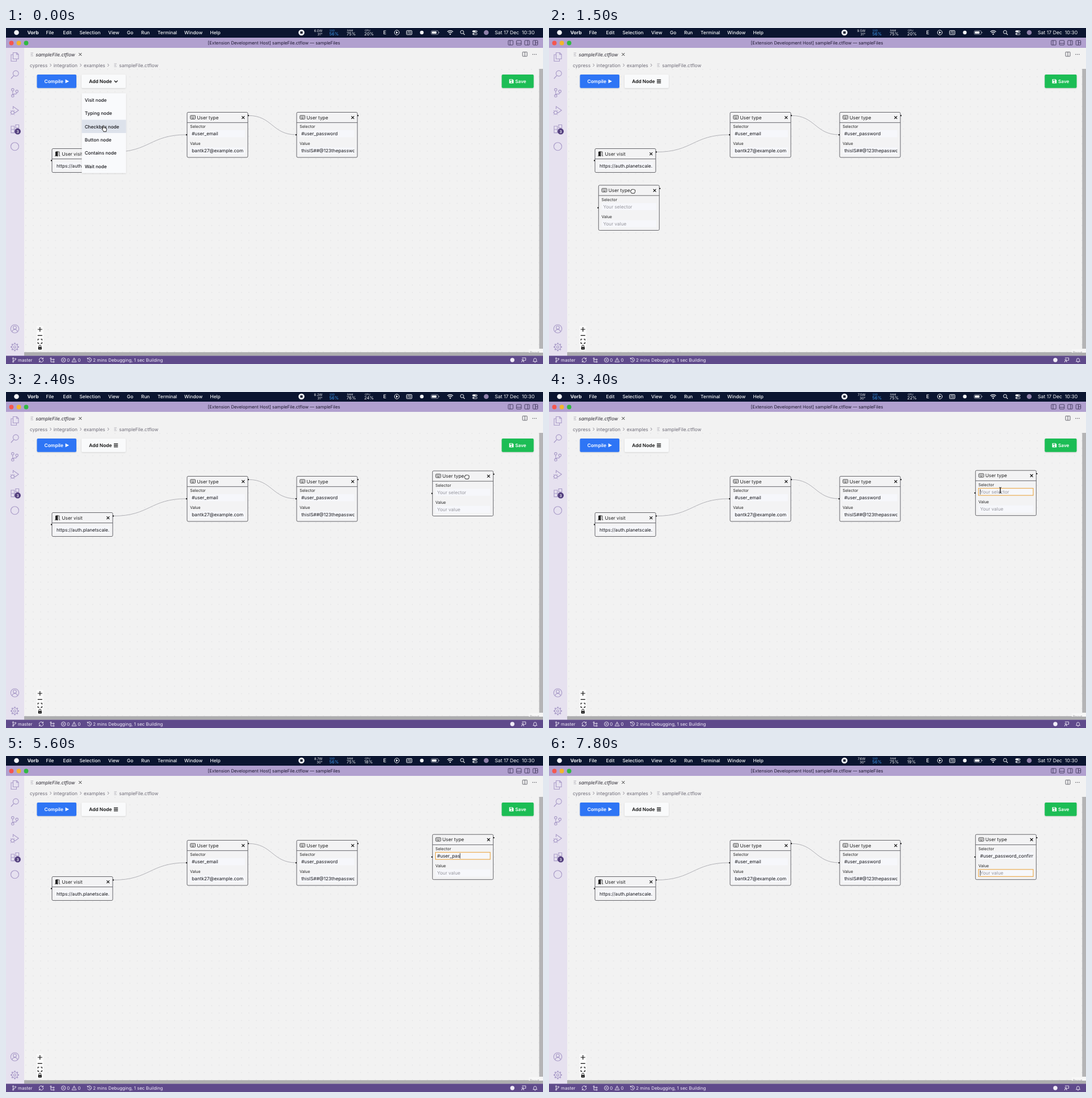
An HTML page for the animation above (8000 ms loop, 946 px wide and 592 px high).

```html
<!DOCTYPE html>
<html lang="en">
<head>
<meta charset="utf-8">
<title>Flow editor</title>
<style>
  html, body { margin: 0; width: 100%; height: 100%; overflow: hidden; background: #f2f2f2; }
  svg { display: block; width: 100vw; height: 100vh; }
  text { font-family: Inter, Roboto, sans-serif; white-space: pre; text-rendering: geometricPrecision; }
</style>
</head>
<body>
<svg id="stage" viewBox="0 0 946 592" xmlns="http://www.w3.org/2000/svg"></svg>
<script>
const LOOP = 8000, STEP = 100;
const INK = '#16161a';

// Markup helpers
const text = (x, y, s, size = 8.2, fill = INK, extra = '') =>
  `<text x="${x}" y="${y}" font-size="${size}" fill="${fill}" ${extra}>${s}</text>`;
const rect = (x, y, w, h, fill, extra = '') =>
  `<rect x="${x}" y="${y}" width="${w}" height="${h}" fill="${fill}" ${extra}/>`;
const circle = (x, y, r, fill, extra = '') =>
  `<circle cx="${x}" cy="${y}" r="${r}" fill="${fill}" ${extra}/>`;
const line = (d, color, width = 1, extra = '') =>
  `<path d="${d}" fill="none" stroke="${color}" stroke-width="${width}" ${extra}/>`;
const shape = (d, fill) => `<path d="${d}" fill="${fill}"/>`;
const at = (x, y, body, extra = '') => `<g transform="translate(${x} ${y})" ${extra}>${body}</g>`;
const bold = 'font-weight="600"', medium = 'font-weight="500"';

function menuBar() {
  const w = '#f4f5f8';
  const menus = [[70.5, 'File'], [100.5, 'Edit'], [129.5, 'Selection'], [180, 'View'], [213, 'Go'],
    [238, 'Run'], [267, 'Terminal'], [314, 'Window'], [359.5, 'Help']];
  return rect(0, 0, 946, 17, '#0b1530')
    + circle(18.5, 8, 4.3, w)
    + text(37.5, 11, 'Vorb', 8.5, w, 'font-weight="700"')
    + menus.map(([x, s]) => text(x, 11, s, 8.3, w, medium)).join('')
    + circle(520.5, 8, 5.3, w) + rect(518.4, 5.9, 4.2, 4.2, '#0b1530', 'rx=".5"')
    + text(557.5, 7.3, '', 6, w, 'id="watt" text-anchor="end"')
    + text(557.5, 13.3, '', 6, w, 'id="temp" text-anchor="end"')
    + text(570, 6.3, 'SSD', 4.6, '#3f9bf2') + text(569.5, 13.3, '56%', 7.6, '#3f9bf2')
    + text(601, 6.3, 'RAM', 4.6, w) + text(600, 13.3, '', 7.6, w, 'id="ram"')
    + text(632, 6.3, 'CPU', 4.6, w) + text(631, 13.3, '', 7.6, w, 'id="cpu"')
    + text(664.5, 11.3, 'E', 9, w, medium)
    + circle(688.5, 8, 4.2, 'none', `stroke="${w}"`) + shape('M687 5.8l3.8 2.2l-3.8 2.2z', w)
    + rect(705.5, 4.5, 9.5, 7.2, 'none', `rx="1" stroke="${w}"`)
    + line('M707 6.8h6.5M707 9.3h2m1 0h3.5', w, 1)
    + circle(732.5, 8, 3.2, w)
    + rect(749, 4.7, 12.5, 6.6, 'none', `rx="1.8" stroke="#a9adba" stroke-width=".8"`)
    + rect(750.2, 5.9, 8.2, 4.2, w, 'rx=".8"') + rect(762.4, 6.9, 1, 2.2, '#a9adba')
    + line('M777.5 6.6q5-4 10 0M779.3 8.6q3.2-2.6 6.4 0', w, 1.3) + circle(782.5, 10.7, 1.2, w)
    + circle(803.4, 7.2, 2.9, 'none', `stroke="${w}"`) + line('M805.5 9.4l2.6 2.6', w, 1.1)
    + rect(821.5, 4.2, 8.8, 3.3, w, 'rx="1.6"') + rect(822, 9, 8, 2.8, 'none', `rx="1.4" stroke="${w}" stroke-width=".8"`)
    + circle(828.2, 5.85, 1, '#0b1530') + circle(823.6, 10.4, 1.1, w)
    + circle(846, 8, 4.3, '#8e7fa8')
    + text(861, 11, 'Sat 17 Dec  10:30', 8.7, w);
}

function titleBar() {
  const c = '#40365a';
  const panes = [['M3.2 0v8', 889], ['M0 5h8.4', 903.5], ['M5.2 0v8', 918], ['M4.2 0v8M4.2 4h4.2', 932.5]];
  return rect(0, 16.5, 946, 18.5, '#b1a0cf')
    + circle(9.5, 26.5, 3.9, '#f5574f') + circle(22.5, 26.5, 3.9, '#f3b52c') + circle(35.5, 26.5, 3.9, '#2fb942')
    + text(355.5, 29, '[Extension Development Host] sampleFile.ctflow — sampleFiles', 7.78, '#1d1830')
    + panes.map(([d, x]) => at(x - 4.2, 22, rect(0, 0, 8.4, 8, 'none', `rx=".8" stroke="${c}" stroke-width=".9"`)
      + line(d, c, .9))).join('');
}

function activityBar() {
  const c = '#a99bc8', w = 1.1;
  const ring = (x, y, r) => circle(x, y, r, 'none', `stroke="${c}" stroke-width="${w}"`);
  const gear = Array.from({ length: 8 }, (_, i) =>
    `<path d="M0-5.2V-7.4" stroke="${c}" stroke-width="2.2" transform="rotate(${i * 45})"/>`).join('');
  return rect(0, 35, 32, 543, '#e6e1ef')
    + line('M12.5 43.5h6.5l3 3v8h-9.5zM12.5 47h-3.5v11.5h9.5v-4M18.7 43.5v3.3h3.3', c, w)
    + ring(17.3, 80, 4.9) + line('M13.8 83.6l-5 5.6', c, w + .2)
    + ring(11.8, 108.8, 2.2) + ring(11.8, 119.6, 2.2) + ring(19.2, 111.6, 2.2)
    + line('M11.8 111v6.4M19.2 113.8q0 2.6-3 2.6h-1.8q-2.6 0-2.6 2', c, w)
    + line('M12.5 143v-4.8l9.7 6.8l-7 5', c, w) + ring(11.6, 149, 2.9)
    + line('M8 145l2 2M15.2 145l-2 2M7.2 149.2h1.5M14.5 149.2h1.8M8 153.4l1.9-2M15.2 153.4l-1.9-2', c, .9)
    + line('M9 173h5.7v11.6H9zM9 178.8h11.4v5.8H9M17 170.5h5.6v5.6h-5.6z', c, w)
    + circle(20.6, 182.2, 5.4, '#54407f') + text(20.6, 184.7, '3', 6.6, '#fff', `text-anchor="middle" ${bold}`)
    + ring(15.5, 208.7, 7)
    + ring(15.5, 530, 7.2) + ring(15.5, 527.8, 2.8) + line('M10.7 535q1-3.8 4.8-3.8t4.8 3.8', c, w)
    + at(15.5, 562, gear + circle(0, 0, 5.2, 'none', `stroke="${c}" stroke-width="${w}"`)
      + circle(0, 0, 2, 'none', `stroke="${c}" stroke-width="${w}"`));
}

function tabs() {
  const c = '#5b5b62', g = '#6f6c78';
  const lines = (x, y) => line(`M${x} ${y - 2.5}h4.5M${x} ${y}h3.5M${x} ${y + 2.5}h4.5`, '#a5a3ad', .8);
  const chev = x => line(`M${x} 63l2.2 2.5l-2.2 2.5`, g, .8);
  return lines(43.5, 46.5) + text(52.3, 49.5, 'sampleFile.ctflow', 8.4, '#28252f', 'font-style="italic"')
    + line('M128.3 44l5 5M133.3 44l-5 5', '#333', 1)
    + rect(910, 42.3, 8, 7.6, 'none', `rx=".6" stroke="${c}" stroke-width=".9"`) + line('M914 42.3v7.6', c, .9)
    + [928, 931, 934].map(x => circle(x, 46.5, .8, c)).join('')
    + text(42, 68.5, 'cypress', 8.4, g) + chev(77.5)
    + text(83.8, 68.5, 'integration', 8.4, g) + chev(130.5)
    + text(137, 68.5, 'examples', 8.4, g) + chev(179)
    + lines(190.5, 65.5) + text(199.3, 68.5, 'sampleFile.ctflow', 8.4, g);
}

function statusBar() {
  const w = '#f1edf8';
  const ring = (x, y, r) => circle(x, y, r, 'none', `stroke="${w}" stroke-width=".9"`);
  return rect(0, 577.5, 946, 14.5, '#5f4a8b')
    + ring(12.6, 582, 1.1) + ring(12.6, 588, 1.1) + ring(16.6, 583.2, 1.1)
    + line('M12.6 583.1v3.8M16.6 584.4q0 1.8-4 2', w, .9)
    + text(21, 587.8, 'master', 7.9, w)
    + line('M58.4 585.5a3.6 3.6 0 0 1 6.6-2.6M65.6 584.5a3.6 3.6 0 0 1-6.6 2.6M65.4 580.8v2.4h-2.4M58.6 589.2v-2.4h2.4', w, .9)
    + ring(79, 582.2, 1.1) + ring(84, 584.2, 1.1) + ring(84, 588.2, 1.1)
    + line('M79 583.4v5h3.8M79 584.2h3.8', w, .9)
    + ring(101.2, 585, 3.7) + line('M99.7 583.5l3 3M102.7 583.5l-3 3', w, .8) + text(107.3, 587.8, '0', 7.9, w)
    + line('M120 581.2l3.9 7.2h-7.8zM120 583.6v2.4M120 586.8v.8', w, .8) + text(126.6, 587.8, '0', 7.9, w)
    + line('M143.8 583a3.6 3.6 0 1 1-.2 3M143.4 580.8v2.4h2.4M147.2 582.8v2.6l1.8 1', w, .9)
    + text(153.3, 587.8, '2 mins Debugging, 1 sec Building', 7.9, w)
    + circle(892, 585, 3.7, w)
    + line('M909 581.2h6.6v4.2h-2.4l-1.6 1.6v-1.6M908.2 589q.2-2.6 2-2.6t2 2.6', w, .9) + ring(910.2, 584.6, 1.2)
    + line('M928.6 587.6q1-1 1-3.3a2.4 2.4 0 0 1 4.8 0q0 2.3 1 3.3zM931 589h2', w, .9);
}

// Flow nodes, drawn around their top left corner
const port = (x, y) => rect(x - 1, y - 1, 2, 2, '#111');
const close = line('M96.4 6.8l4.8 4.8M101.2 6.8l-4.8 4.8', '#111', 1.2);
const frame = h => rect(0, 0, 107, h, '#f3f3f4', 'rx="2" stroke="#56565c" stroke-width=".9"')
  + line('M0 18.2H107', '#56565c', .9);
const keyboard = rect(5.8, 5.7, 8.8, 6.2, 'none', 'rx="1" stroke="#333" stroke-width=".9"')
  + line('M7.2 7.7h6.2M7.2 9.2h6.2', '#333', .8, 'stroke-dasharray=".9 .6"') + line('M8.4 10.6h3.6', '#333', .7);
const door = shape('M6 5.4l4.4-1v9.4l-4.4-.7z', '#222') + line('M10.8 5.6h2v7.2h1.4M5 13h1', '#222', .9);

const field = (label, value, y, id) =>
  text(5.2, y - 4, label, 7.05, '#222')
  + rect(5.3, y, 96.4, 12.4, '#f6f7fb', id ? `id="${id}Box" stroke-width="1.1"` : '')
  + `<g clip-path="url(#inside)">` + text(8.2, y + 9.1, value, 8.2, INK, id ? `id="${id}"` : '') + '</g>';
const typeNode = (selector, value, ids = []) => frame(79.5) + keyboard
  + text(17.4, 12.1, 'User type', 8.25, '#222') + close
  + field('Selector', selector, 31.5, ids[0]) + field('Value', value, 61.7, ids[1])
  + port(-1, 39.7) + port(108, 5.8);
const visitNode = url => frame(42) + door
  + text(17.4, 12.6, 'User visit', 8.25, '#222') + close
  + rect(5.3, 24, 96.4, 12.6, '#f6f7fb') + text(8, 33.5, url, 8.15)
  + port(-1, 21) + port(108, 6);

const edge = (x1, y1, x2, y2) => {
  const m = (x1 + x2) / 2;
  return line(`M${x1} ${y1}C${m} ${y1} ${m} ${y2} ${x2} ${y2}`, '#a9a9ae', .9);
};

function toolbar() {
  return rect(54.5, 82, 69.5, 23.7, '#2f74f5', 'rx="2" filter="url(#shadow)"')
    + text(67.6, 97, 'Compile', 8.4, '#fff', bold) + shape('M104.6 90.6l6.4 3.3l-6.4 3.3z', '#fff')
    + rect(133, 82, 78, 23.7, '#f9fafb', 'rx="2" filter="url(#shadow)"')
    + text(146.3, 97, 'Add Node', 8.4, '#111', bold)
    + line('', '#111', 1.3, 'id="menuIcon"')
    + rect(873.3, 82, 56.3, 23.7, '#1fbd55', 'rx="2" filter="url(#shadow)"')
    + shape('M886.5 90.2h5.8l1.9 1.9v5.4h-7.7z', '#fff')
    + rect(888, 91.2, 3.6, 1.7, '#1fbd55') + circle(890.3, 95.4, 1.1, '#1fbd55')
    + text(897, 97, 'Save', 8.2, '#fff', bold);
}

const ROW = 23.35;
const dropdown = '<g id="menu">' + rect(133.5, 115, 78, 140.5, '#f9fafc', 'filter="url(#shadow)"')
  + rect(133.5, 0, 78, ROW, '#dde2eb', 'id="hover"')
  + ['Visit', 'Typing', 'Checkbox', 'Button', 'Contains', 'Wait'].map((s, i) =>
    text(138.7, 129.9 + i * ROW, s + ' node', 8.1, '#17171c', medium)).join('') + '</g>';

const controls = rect(54, 525, 11.5, 43, '#fbfbfb')
  + line('M55.8 531h8M59.8 527v8M55.8 541.6h8', '#111', 1.2)
  + line('M56.2 550.4v-2.2h2.2M61.2 548.2h2.2v2.2M63.4 553.4v2.2h-2.2M58.4 555.6h-2.2v-2.2', '#111', 1.1)
  + rect(56.8, 562, 6, 4.6, '#111', 'rx=".6"') + line('M58 562v-1.4a1.8 1.8 0 0 1 3.6 0v1.4', '#111', 1)
  + circle(59.8, 564.2, .8, '#fff');

const scrollbars = rect(939.3, 72, 6.7, 493, '#b4b4b6') + rect(32, 571.2, 914, 6.5, '#adadaf')
  + rect(921, 566, 25, 6, '#f7f7f7')
  + `<g clip-path="url(#credit)">${text(923, 574, 'React Flow', 6, '#8a8a8e')}</g>`;

const stage = document.getElementById('stage');
stage.innerHTML = `<defs>
  <pattern id="dots" x="41.5" y="66.5" width="13.1" height="13.1" patternUnits="userSpaceOnUse">${circle(6.5, 6.5, .55, '#cfcfd3')}</pattern>
  <filter id="shadow" x="-10%" y="-20%" width="120%" height="150%"><feDropShadow dx="0" dy=".8" stdDeviation="1" flood-opacity=".16"/></filter>
  <clipPath id="inside"><rect x="7" y="20" width="94.6" height="60"/></clipPath>
  <clipPath id="credit"><rect x="921" y="566" width="20" height="6"/></clipPath>
</defs>`
  + rect(0, 0, 946, 592, '#f2f2f2') + rect(32, 72, 908, 500, 'url(#dots)')
  + edge(189, 218.5, 318, 188) + edge(427, 154.3, 511, 188)
  + at(81, 212.5, visitNode('https://auth.planetscale.'))
  + at(319, 148.5, typeNode('#user_email', 'bantk27@example.com'))
  + at(512, 148.5, typeNode('#user_password', 'thisIS##@123thepassword'))
  + at(0, 0, typeNode('', '', ['selector', 'value']) + line('', '#111', .8, 'id="caret"'), 'id="fresh"')
  + toolbar() + dropdown + controls + scrollbars
  + tabs() + activityBar() + titleBar() + menuBar() + statusBar()
  + '<path id="mouse" stroke="#111" stroke-width=".9" stroke-linejoin="round"/>';

const el = {};
stage.querySelectorAll('[id]').forEach(n => el[n.id] = n);
const set = (n, attrs) => { for (const k in attrs) n.setAttribute(k, attrs[k]); };
const show = (n, on) => n.setAttribute('visibility', on ? 'visible' : 'hidden');

// Linear path through [time, x, y] points
function along(keys, t) {
  if (t <= keys[0][0]) return keys[0].slice(1);
  const i = keys.findIndex(k => k[0] > t);
  if (i < 0) return keys[keys.length - 1].slice(1);
  const [a, b] = [keys[i - 1], keys[i]], p = (t - a[0]) / (b[0] - a[0]);
  return [a[1] + (b[1] - a[1]) * p, a[2] + (b[2] - a[2]) * p];
}

const mousePath = [[0, 173, 177], [100, 173, 173], [300, 172, 159], [500, 172, 154], [700, 172, 154],
  [1100, 161, 225], [1500, 148, 287], [1600, 240, 265], [1800, 650, 160], [1900, 822, 132],
  [2000, 824, 132], [2200, 815, 145], [2400, 812, 149], [2600, 811, 150], [3200, 795, 173]];
const nodePath = [[1500, 87.3, 277], [1600, 150, 262], [1800, 540, 167], [1900, 714.3, 129.5],
  [2000, 757, 126], [2200, 754, 135], [2400, 751.3, 139], [2500, 751.3, 138.2]];

const hands = {
  point: 'M-2.4 .5V-4.4a.9 .9 0 0 1 1.8 0V-1.4l3.6 .8q1.4 .4 1.2 1.8l-.6 3.2v1.2h-4.8v-1l-2.6-3.2q-.8-1.4 1.4-.6z',
  open: 'M-3 5L-5 1q-.6-1.6 .8-1.4l1 1V-3.4q.8-1.2 1.6 0l.2-1q.9-1 1.7 0l.1 .8q1-.9 1.7 .2v1q1.2-.6 1.5 .5V1.5L2.6 5z',
  grab: 'M-2.6 4.2L-4.4 .8q-.2-1.6 1.4-1.4V-2q.8-1.2 1.8-.4q1-.8 1.8 0q1-.6 1.7 .3q1.3-.2 1.4 1V1.4L2.6 4.2z',
  beam: 'M-2-5q2 0 2 1.2V4q0 1.2-2 1.2M2-5q-2 0-2 1.2V4q0 1.2 2 1.2'
};

// Time, power, temperature, memory, processor
const stats = [[0, '6.0W', 31, 75, 20], [1200, '9.5W', 31, 75, 20], [2200, '8.2W', 31, 76, 24],
  [3200, '7.5W', 30, 75, 22], [5200, '8.7W', 30, 75, 18], [7200, '7.6W', 30, 75, 19]];

const WORD = '#user_password_confirmation', TAB = 7500;
const early = [3900, 4100, 4200, 4300, 4700, 5000];
function typedCount(t) {
  if (t < 5400) return early.filter(k => k <= t).length;
  if (t < 6400) return Math.min(14, 7 + Math.floor((t - 5400) / 100));
  if (t < 6600) return 15;
  return Math.min(WORD.length, 16 + Math.floor((t - 6600) / 70));
}

function fill(node, value, hint) {
  node.textContent = value || hint;
  node.setAttribute('fill', value ? INK : '#96969e');
}

function drawFields(t) {
  const typed = WORD.slice(0, typedCount(t));
  const onSelector = t >= 3400 && t < TAB, onValue = t >= TAB;
  fill(el.selector, typed, 'Your selector');
  fill(el.value, '', 'Your value');
  const width = typed ? el.selector.getComputedTextLength() : 0;
  const scroll = onSelector ? Math.max(0, width - 92) : 0;
  el.selector.setAttribute('x', 8.2 - scroll);
  el.selectorBox.setAttribute('stroke', onSelector ? '#eaa643' : 'none');
  el.valueBox.setAttribute('stroke', onValue ? '#eaa643' : 'none');
  const x = onSelector ? 8.4 + width - scroll : 8.4, y = onSelector ? 33 : 63.2;
  el.caret.setAttribute('d', `M${x} ${y}v9.4`);
  show(el.caret, onSelector || onValue);
}

function draw(t) {
  const open = t < 700;
  const [mx, my] = along(mousePath, t), [nx, ny] = along(nodePath, t);

  show(el.menu, open);
  el.hover.setAttribute('y', 115 + Math.floor((my - 115) / ROW) * ROW);
  set(el.menuIcon, { d: open ? 'M190.8 92.6l2.9 2.9l2.9-2.9' : 'M190 91.3h7.2M190 94h7.2M190 96.7h7.2' });

  set(el.fresh, { transform: `translate(${nx} ${ny})` });
  el.fresh.style.display = open ? 'none' : '';
  drawFields(t);

  const kind = open ? 'point' : t < 1500 ? 'open' : t < 2500 ? 'grab' : my < 168 ? 'open' : 'beam';
  set(el.mouse, { d: hands[kind], fill: kind === 'beam' ? 'none' : '#fff', transform: `translate(${mx} ${my})` });
  show(el.mouse, t < 3900);

  const [, watt, temp, ram, cpu] = stats.filter(s => s[0] <= t).pop();
  el.watt.textContent = watt;
  el.temp.textContent = temp + '°';
  el.ram.textContent = ram + '%';
  el.cpu.textContent = cpu + '%';
}

const start = performance.now();
function tick() {
  const t = (performance.now() - start) % LOOP;
  draw(Math.floor(t / STEP) * STEP);
  requestAnimationFrame(tick);
}
draw(0);
tick();
</script>
</body>
</html>
```
